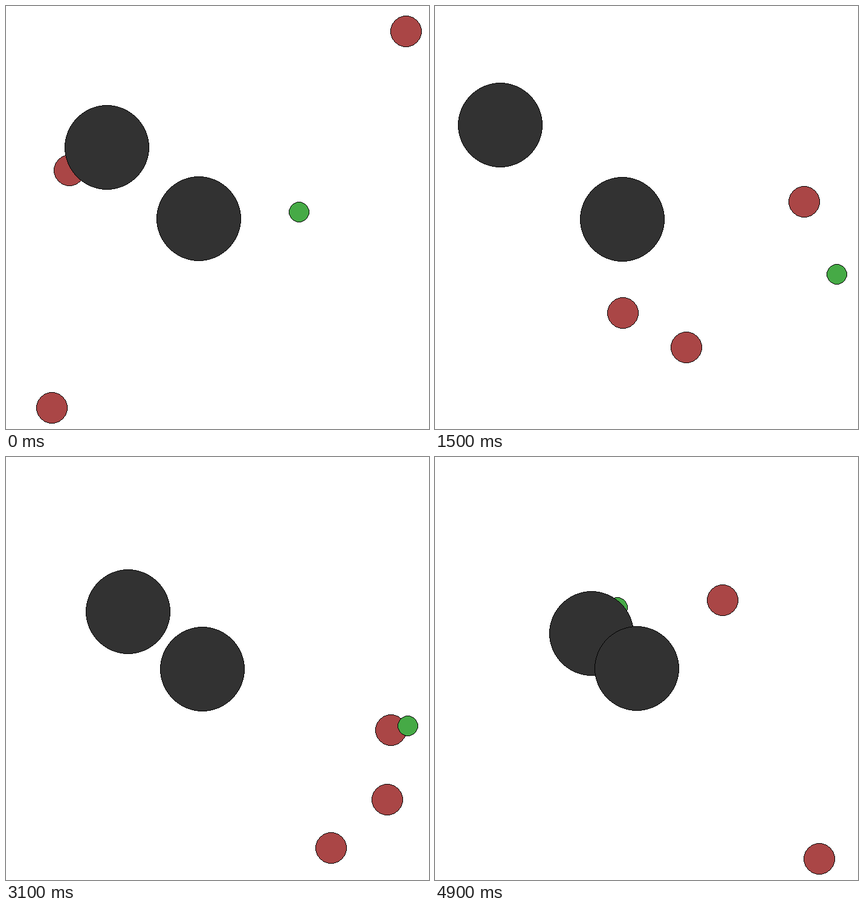
An HTML page with a canvas for the animation above (5 s loop, 700 by 700 pixels).

```html
<!DOCTYPE html>
<html>
<head>
<meta charset="utf-8">
<style>
html, body { margin: 0; width: 100%; height: 100%; overflow: hidden; background: #fff; }
canvas { display: block; }
</style>
</head>
<body>
<canvas width="700" height="700"></canvas>
<script>
const SIZE = 700, HALF = SIZE / 2, STEP = 100, STEPS = 50;
const RED = '#aa4646', GREEN = '#46aa46', DARK = '#323232';
const ctx = document.querySelector('canvas').getContext('2d');

// Way-points [step, x, y] in world units, y pointing down; bodies in paint order
const bodies = [
  { r: 26, color: RED, path: [[0, .983, -.966], [8, .631, -.663], [12, .588, -.346],
    [19, .714, .284], [31, 1.096, .847], [40, 1.128, -.062], [49, .799, -.708]] },
  { r: 26, color: RED, path: [[0, -.768, -.242], [3, -.955, -.06], [8, -.787, .287],
    [12, -.4, .35], [19, .292, .399], [31, 1.116, .4], [40, .909, -.051], [49, .17, -.05]] },
  { r: 26, color: RED, path: [[0, -.859, .99], [8, -.5, .694], [12, -.168, .558],
    [19, .523, .54], [31, .732, 1.155], [36, .72, 1.68], [40, .925, 1.876], [49, 1.812, 1.991]] },
  { r: 17, color: GREEN, path: [[0, .426, -.027], [8, .492, -.026], [12, .656, .007],
    [19, .869, .577], [24, 1.041, .98], [31, 1.223, .372], [40, .7, -.437], [49, -.299, -.634]] },
  { r: 70, color: DARK, path: [[0, -.5725, -.361]] },
  { r: 70, color: DARK, path: [[0, -.0935, .0087]] }
];

// Smooth curve through the way-points; axis 1 is x, axis 2 is y
function along(path, axis, t) {
  const last = path.length - 1;
  if (!last) return path[0][axis];
  const i = Math.max(0, path.findLastIndex((p, k) => k < last && p[0] <= t));
  const slope = k => {
    const a = path[Math.max(k - 1, 0)], b = path[Math.min(k + 1, last)];
    return (b[axis] - a[axis]) / (b[0] - a[0]);
  };
  const a = path[i], b = path[i + 1];
  const h = b[0] - a[0], s = (t - a[0]) / h, q = 1 - s;
  return a[axis] * q * q * (1 + 2 * s) + b[axis] * s * s * (3 - 2 * s)
    + h * s * q * (q * slope(i) - s * slope(i + 1));
}

// Midpoint circle without smoothing: rows of fill, then a one-pixel rim
function disc(cx, cy, r, color) {
  const rim = [];
  for (let x = 0, y = r, f = 1 - r; x < y;) {
    if (f >= 0) f -= 2 * --y;
    f += 2 * ++x + 1;
    rim.push([x, y], [y, x]);
  }
  ctx.fillStyle = color;
  for (const [x, y] of rim)
    for (const row of [cy - y, cy + y - 1]) ctx.fillRect(cx - x, row, 2 * x, 1);
  ctx.fillStyle = '#000';
  for (const [x, y] of rim)
    for (const row of [cy - y, cy + y - 1])
      for (const col of [cx - x, cx + x - 1]) ctx.fillRect(col, row, 1, 1);
}

const toPixel = u => Math.floor(Math.floor(u * HALF) * .9 + HALF);

function draw(now) {
  const step = Math.floor(now / STEP) % STEPS;
  const at = bodies.map(b => [1, 2].map(axis => along(b.path, axis, step)));
  // The camera zooms so that the farthest body stays in view
  const range = Math.max(...at.flat().map(Math.abs));
  ctx.fillStyle = '#fff';
  ctx.fillRect(0, 0, SIZE, SIZE);
  bodies.forEach((b, i) => disc(...at[i].map(v => toPixel(v / range)), b.r, b.color));
}

const start = performance.now();
function loop() {
  draw(performance.now() - start);
  requestAnimationFrame(loop);
}
loop();
</script>
</body>
</html>
```
